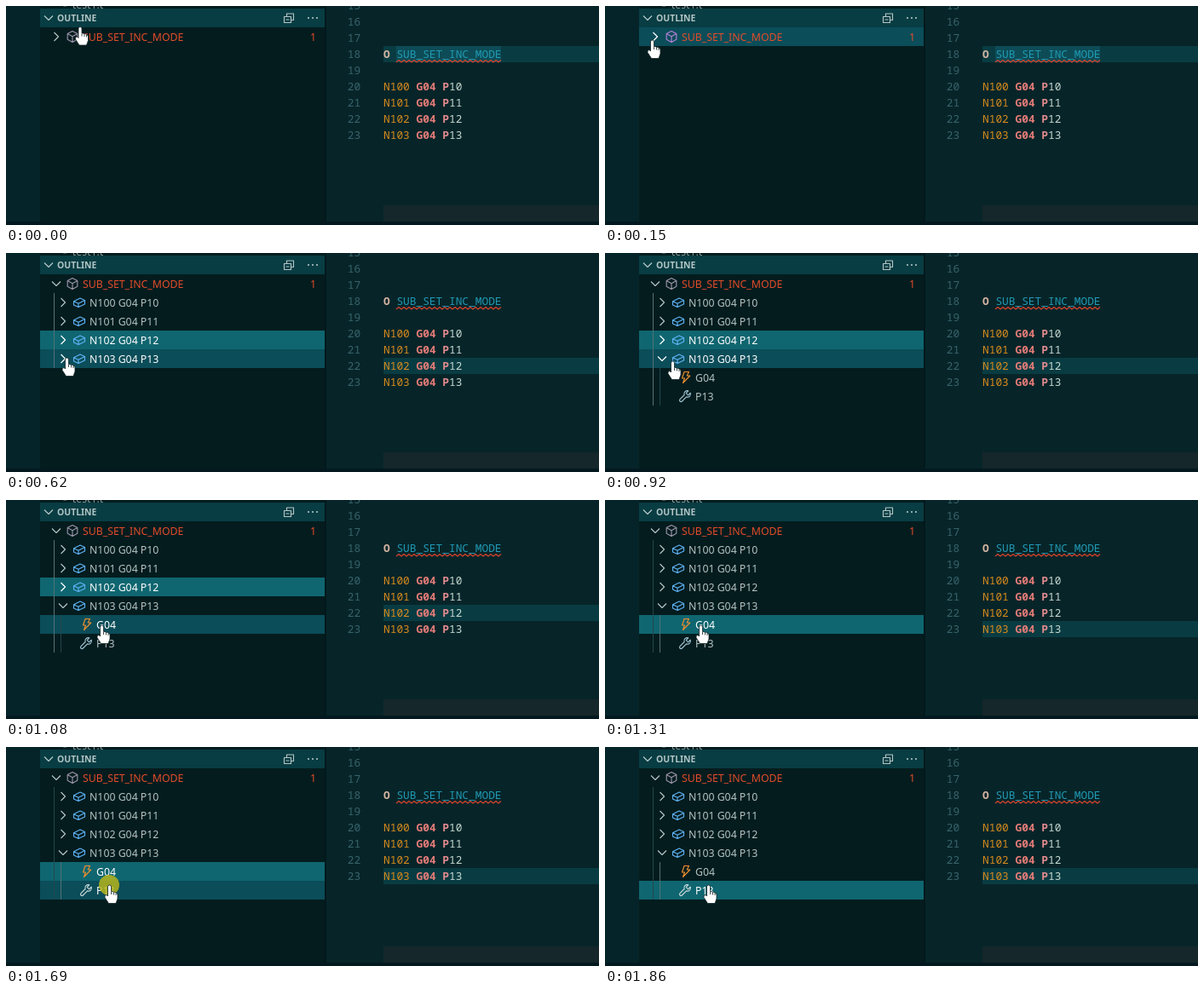
Recreate the animation shown at these times as an HTML page. Size 696x257 px, loop 2.09 s.

```html
<!DOCTYPE html>
<html lang="en">
<head>
<meta charset="utf-8">
<title>Outline tree</title>
<style>
  html, body { margin: 0; width: 100%; height: 100%; overflow: hidden; background: #072529; }
  svg { display: block; }
  text { white-space: pre; }
  .tree { font: 12.3px "Noto Sans", "Open Sans", sans-serif; }
  .title { font: 700 10.4px "Noto Sans", "Open Sans", sans-serif; }
  .code { font: 12.83px "Noto Sans Mono", monospace; }
  .bold { font-weight: 700; }
  .line { fill: none; stroke-width: 1.15; stroke-linejoin: round; }
</style>
</head>
<body>
<svg id="stage" width="696" height="257" viewBox="0 0 696 257"></svg>
<script>
const LOOP = 2090, ROW = 22, LINE = 19;
const RED = '#e34c2a', TEXT = '#b3c3c3', BLUE = '#5fb2f5';
const codes = [10, 11, 12, 13].map((p, i) => `N${100 + i} G04 P${p}`);

// Each step: start time, pointer x and y, and the properties that change.
const steps = [
  [0, 86.5, 24.5, { open: false, child: false, selected: -1, current: 18, click: false }],
  [80, 70, 32, {}],
  [150, 55, 40, {}],
  [300, 55, 40, { click: true }],
  [400, 55, 40, { open: true, click: false }],
  [460, 60, 71, {}],
  [540, 67, 103, { click: true }],
  [620, 71, 123, { selected: 3, current: 22, click: false }],
  [690, 71, 123, { click: true }],
  [770, 71, 123, { child: true, click: false }],
  [850, 79, 127, {}],
  [930, 94, 136, {}],
  [1010, 107, 144, {}],
  [1080, 112, 147, {}],
  [1310, 112, 147, { selected: 5, current: 23 }],
  [1390, 114, 150, {}],
  [1460, 117, 155, {}],
  [1540, 120, 160, {}],
  [1620, 121, 162, {}],
  [1690, 121, 162, { click: true }],
  [1860, 121, 162, { selected: 6, click: false }]
];
const states = [];
for (const [time, x, y, change] of steps) states.push({ ...states.at(-1), time, x, y, ...change });

const rect = (x, y, w, h, fill) => `<rect x="${x}" y="${y}" width="${w}" height="${h}" fill="${fill}"/>`;
const label = (x, y, text, fill, cls = 'tree') => `<text x="${x}" y="${y}" fill="${fill}" class="${cls}">${text}</text>`;
const path = (x, y, d, stroke) => `<path class="line" transform="translate(${x} ${y})" d="${d}" stroke="${stroke}"/>`;
const chevron = (x, y, open, color) => path(x, y, open ? 'M-5-2.5L0 2.5L5-2.5' : 'M-2.5-5L2.5 0L-2.5 5', color);

const icons = {
  cube: 'M0-6.5L5.8-3.5V3.3L0 6.5L-5.8 3.3V-3.5ZM-5.8-3.5L0-.3L5.8-3.5M0-.3V6.5',
  field: 'M-6.5-1.3L1-5L6.5-2.5V2L-1 5.5L-6.5 3ZM-6.5-1.3L-1 1.2L6.5-2.5M-1 1.2V5.5',
  bolt: 'M-2-6.5H3.5L1.2-2H4.8L-3.5 6.5L-1.5 1H-4.5Z',
  wrench: 'M6.2-3.8L3.6-1.2L1.2-3.6L3.8-6.2C.8-7.2-2-4.4-.9-1.5L-6 3.6C-7.5 5.3-5.2 7.5-3.6 6L1.5.9C4.5 2 7.2-.8 6.2-3.8Z'
};

function sidebar(s) {
  const hover = Math.floor((s.y - 25) / ROW);
  const middle = row => 36 + ROW * row;
  const active = row => row === hover || row === s.selected;
  const color = row => active(row) ? '#fff' : TEXT;
  const count = s.open ? s.child ? 7 : 5 : 1;

  let out = rect(40, 0, 334, 253, '#041c1e') + label(67, 2.5, '▫  test1.t', '#8b9c9d');
  out += rect(40, 3, 334, 22, '#083d43') + chevron(50, 14, true, '#b9c9c9')
    + label(60, 18, 'OUTLINE', '#b2c4c4', 'title')
    + path(332, 14, 'M-5.5-1.5H2.5V5.5H-5.5ZM-2.5-1.5V-5H5.5V2.5H2.5M-3.5 2H.5', '#b2c4c4');
  for (const x of [355, 360, 365]) out += `<circle cx="${x}" cy="14" r="1.1" fill="#b2c4c4"/>`;

  for (const row of [hover, s.selected])
    if (row >= 0 && row < count)
      out += rect(40, 25 + ROW * row, 334, ROW, row === s.selected ? '#0f6670' : '#0b4d59');

  const guide = (x, top, bright) => rect(x, top, 1, 25 + ROW * count - top, bright ? '#527175' : '#24474b');
  if (s.open) out += guide(56, 47, s.selected === 3);
  if (s.child) out += guide(64, 135, s.selected > 4);

  out += chevron(59, 36, s.open, color(0)) + path(78, 36, icons.cube, hover === 0 ? '#b180d7' : '#9a92a8')
    + label(90, 40.5, 'SUB_SET_INC_MODE', RED) + label(357, 40.5, '1', RED);
  if (s.open) codes.forEach((code, i) => {
    const row = i + 1, y = middle(row);
    out += chevron(67, y, s.child && row === 4, color(row)) + path(86, y, icons.field, BLUE)
      + label(98, y + 4.5, code, color(row));
  });
  if (s.child) {
    out += path(95, 146, icons.bolt, '#ee9030') + label(106, 150.5, 'G04', color(5))
      + path(94, 168, icons.wrench, active(6) ? '#c9d8d8' : '#9fc3d2') + label(106, 172.5, 'P13', color(6));
  }
  return out;
}

function editor(s) {
  const top = line => 47 + LINE * (line - 18);
  const base = line => top(line) + 14;
  const column = n => 443 + 7.7 * n;
  let out = rect(374, 0, 2, 253, '#03191c') + rect(443, top(s.current), 253, LINE, '#093c42')
    + rect(443, 234, 253, 19, '#15272a');
  if (s.current === 18) out += rect(458, 47, 123, LINE, '#0d4c56');
  for (let line = 15; line <= 23; line++) out += label(400.8, base(line), line, '#38636b', 'code');

  out += label(443, base(18), 'O', '#d5b5a2', 'code bold')
    + label(column(2), base(18), 'SUB_SET_INC_MODE', '#2199b3', 'code');
  const wave = Array.from({ length: 42 }, (_, i) => `${458 + 3 * i},${i % 2 ? 63.5 : 66}`).join(' ');
  out += `<polyline class="line" points="${wave}" stroke="#d9432c"/>`;

  codes.forEach((code, i) => {
    const y = base(20 + i);
    out += label(443, y, code.slice(0, 4), '#d68a1d', 'code')
      + label(column(5), y, 'G04', '#e67c78', 'code bold')
      + label(column(9), y, 'P', '#e58c90', 'code bold')
      + label(column(10), y, code.slice(10), '#c5d8d1', 'code');
  });
  return out;
}

function pointer(s) {
  const halo = s.click ? `<circle cx="${s.x}" cy="${s.y}" r="12" fill="#b5b51c" fill-opacity=".85"/>` : '';
  return `${halo}<g transform="translate(${s.x} ${s.y})" stroke="#102124" stroke-width=".8">
    <path fill="#fff" d="M-1.5 2Q-1.5 0 .5 0T2.5 2V7.5Q4-.5+7 5.5 8.5Q7 7.5 8 9.2Q10 9 10 11.5V16L8 21.5H-.5L-5 14.5Q-5.5 11.5-3 11.5L-1.5 13Z"/>
    <path fill="none" d="M2.5 8V11M5.5 8.8V11.5M8 9.5V12"/></g>`.replace('Q4-.5+7', 'Q4 7');
}

const stage = document.getElementById('stage');
let shown;
function draw() {
  const time = performance.now() % LOOP;
  const state = states.findLast(s => s.time <= time);
  if (state !== shown) {
    shown = state;
    stage.innerHTML = rect(0, 0, 696, 257, '#072529') + rect(0, 0, 39, 253, '#05242a')
      + sidebar(state) + editor(state) + rect(0, 253, 696, 4, '#03191f') + pointer(state);
  }
  requestAnimationFrame(draw);
}
draw();
</script>
</body>
</html>
```
